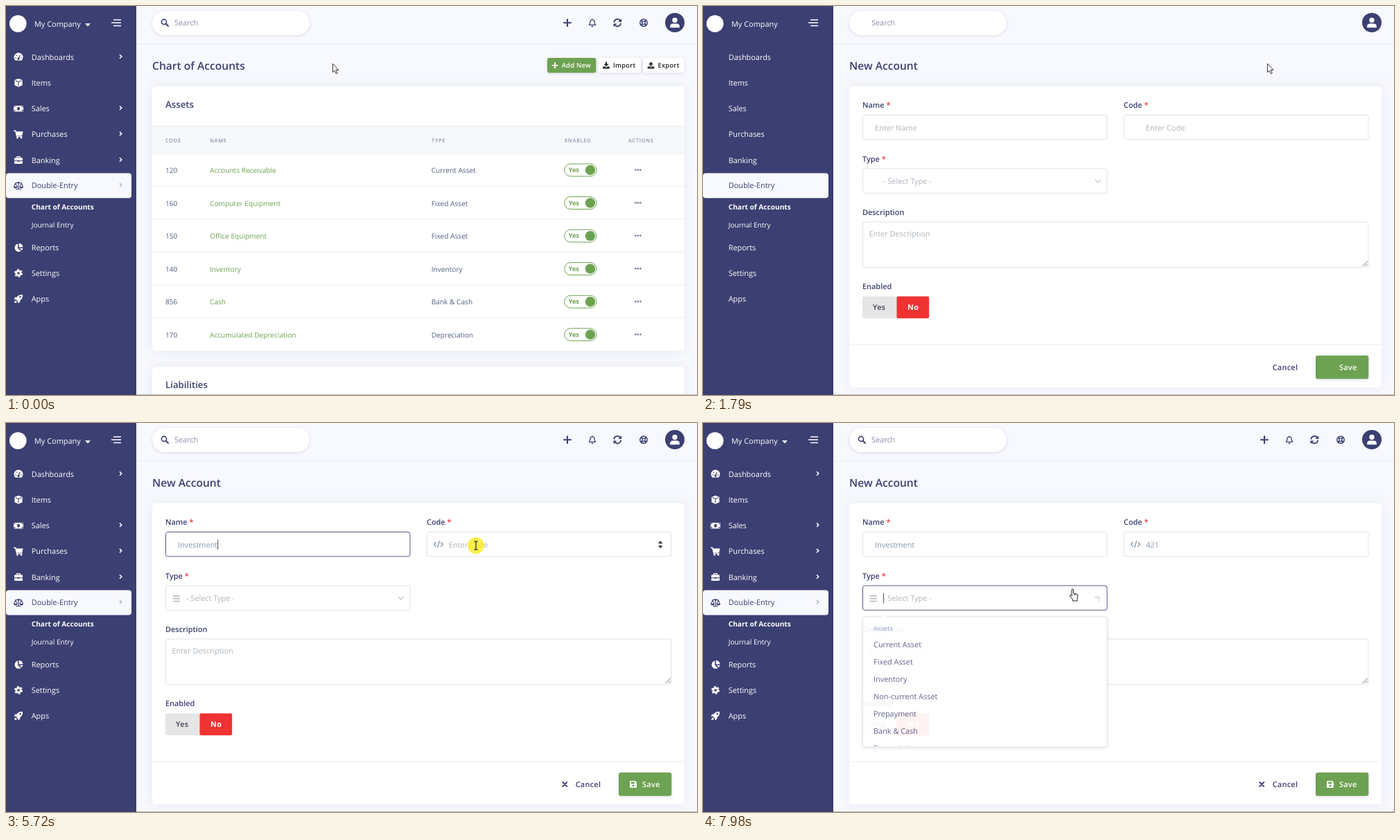
Recreate the animation shown at these times as an HTML page. Size 997 px wide and 562 px high, loop 8000 ms.

```html
<!DOCTYPE html>
<html lang="en">
<head>
<meta charset="utf-8">
<title>Chart of Accounts</title>
<style>
html, body { margin: 0; width: 100%; height: 100%; overflow: hidden; background: #f8f9fe; }
svg { display: block; font-family: "Open Sans", sans-serif; text-rendering: geometricPrecision; }
text { white-space: pre; }
.card { fill: #fff; filter: drop-shadow(0 0 8px rgba(136, 152, 170, .17)); }
.btn { filter: drop-shadow(0 1px 2px rgba(50, 50, 93, .16)); }
.field { fill: #fff; stroke: #dee2e6; }
.field.focus { stroke: #55588f; }
</style>
</head>
<body>
<svg id="stage" width="997" height="562" viewBox="0 0 997 562"></svg>
<script>
const LOOP = 8000, TICK = 77;
const NAVY = '#3c3f72', GREEN = '#6da252', SLATE = '#525f7f', GREY = '#8898aa', PALE = '#adb5bd',
      RED = '#ef3232', LINE = '#e9ecef', BASE = 10.92, SMALL = 10.15;

// Text placed by the middle of its capitals
const text = (x, y, s, fill = NAVY, size = BASE, weight = 400, more = '') =>
  `<text x="${x}" y="${y + size * .357}" font-size="${size}" font-weight="${weight}" fill="${fill}" ${more}>${s}</text>`;
const rect = (x, y, w, h, fill, r = 0, more = '') =>
  `<rect x="${x}" y="${y}" width="${w}" height="${h}" rx="${r}" fill="${fill}" ${more}/>`;
const dot = (x, y, r, fill, more = '') => `<circle cx="${x}" cy="${y}" r="${r}" fill="${fill}" ${more}/>`;
const fill = (d, c, more = '') => `<path d="${d}" fill="${c}" ${more}/>`;
const line = (d, c, w = 1, more = '') => `<path d="${d}" fill="none" stroke="${c}" stroke-width="${w}" ${more}/>`;
const icon = (x, y, body) => `<g class="icon" transform="translate(${x} ${y})">${body}</g>`;
const group = (id, body, more = '') => `<g id="${id}" ${more}>${body}</g>`;
const round = 'stroke-linecap="round" stroke-linejoin="round"';
const spaced = 'letter-spacing=".025em"';

const icons = {
  gauge: fill('M-4.6 5A6.5 6.5 0 1 1 4.6 5Z', '#fff') + line('M0 2.5L2.2-2.8', NAVY, 1.2) + dot(0, 2.6, 1.6, NAVY) +
    dot(-4, 1, .8, NAVY) + dot(-2.6, -2.4, .8, NAVY) + dot(4, 1, .8, NAVY),
  cube: fill('M0-6.2L5.6-4V3.6L0 6L-5.6 3.6V-4Z', '#fff') + line('M-4.4-3.3L0-1.6L4.4-3.3M0-1.6V4.6', NAVY, 1.1),
  money: rect(-7, -4, 14, 8.4, '#fff', 1) + `<ellipse cy=".2" rx="2" ry="2.5" fill="${NAVY}"/>` +
    [-1, 1].map(s => dot(5.6 * s, -2.7, 1, NAVY) + dot(5.6 * s, 3, 1, NAVY)).join(''),
  cart: line('M-6.5-5H-4.3L-2.3 2.9H4.8', '#fff', 1.5, round) + fill('M-4-4H6.6L5.3 1.7H-2.8Z', '#fff') +
    dot(-1.5, 5, 1.4, '#fff') + dot(4, 5, 1.4, '#fff'),
  bag: line('M-2.2-3V-5H2.2V-3', '#fff', 1.3) + rect(-6, -3.4, 12, 8.6, '#fff', 1.2) +
    line('M-6 1H6', NAVY, 1) + rect(-1.3, .2, 2.6, 2, NAVY),
  scale: line('M0-5V4.6M-3.6 5H3.6M-4.5-4H4.5M-6.4 1.6L-4.2-3.4L-2 1.6M6.4 1.6L4.2-3.4L2 1.6', NAVY, 1.1) +
    fill('M-7 1.4H-1.4A2.8 2.4 0 0 1-7 1.4ZM1.4 1.4H7A2.8 2.4 0 0 1 1.4 1.4Z', NAVY) + dot(0, -4.2, 1.4, NAVY),
  pie: fill('M-1-5.4V.8L3.6 5A5.8 5.8 0 1 1-1-5.4Z', '#fff') + fill('M.6-6.2A6 6 0 0 1 6.4-.6H.6Z', '#fff') +
    fill('M1.6.9H6.4A6 6 0 0 1 4.7 4Z', '#fff'),
  cog: dot(0, 0, 3.2, 'none', 'stroke="#fff" stroke-width="2.8"') +
    dot(0, 0, 5, 'none', 'stroke="#fff" stroke-width="2" stroke-dasharray="2.6 2.636"'),
  rocket: fill('M6-6C1-6.4-1.4-4-2.6-2.2H-5L-6.4.8L-3.6 1L-1 3.6L-.8 6.2L2.2 4.8V2.4C4.4 1 6.4-1.4 6-6Z', '#fff') +
    dot(2.6, -2.7, 1.2, NAVY) + fill('M-4 2.4L-2 4.4Q-3 6-6 6Q-6 3.2-4 2.4Z', '#fff')
};

function sidebar() {
  const items = [['Dashboards', 'gauge', 73.7, 1], ['Items', 'cube', 111], ['Sales', 'money', 148, 1],
    ['Purchases', 'cart', 185.3, 1], ['Banking', 'bag', 222.7, 1], ['Double-Entry', 'scale', 259.5, 1],
    ['Reports', 'pie', 349, 0], ['Settings', 'cog', 386], ['Apps', 'rocket', 423]];
  return rect(0, 0, 188, 562, NAVY) + dot(17.3, 25.5, 12.3, '#fff') +
    text(41, 25.8, 'My Company', '#fff') + icon(118, 27.3, fill('M-4-2H4L0 2.3Z', '#fff')) +
    line('M155 20H166M152 24.3H166M155 28.5H166', '#fff', 1.4) +
    rect(0, 241.5, 181, 36, '#f8f9fe', 4) +
    items.map(([label, name, y, more]) => {
      const on = name === 'scale';
      return icon(18, y, icons[name]) + text(36.7, y, label, on ? NAVY : '#fff') +
        (more ? icon(165.5, y - .7, line('M-1.5-2.7L1.3 0L-1.5 2.7', on ? '#b4b8c8' : '#fff', 1.5)) : '');
    }).join('') +
    text(36.7, 290, 'Chart of Accounts', '#fff', SMALL, 700) + text(36.7, 316, 'Journal Entry', '#fff', SMALL);
}

function header() {
  const glass = dot(-1, -1, 3.6, 'none', `stroke="${NAVY}" stroke-width="1.6"`) + line('M1.8 1.8L5 5', NAVY, 2, round);
  const bell = line('M-4.6 3.2C-3 1.6-3.4-.5-3-2A3.1 3.1 0 0 1 3-2C3.4-.5 3 1.6 4.6 3.2Z', NAVY, 1.3, round) +
    line('M0-5.6V-4.6', NAVY, 1.4) + fill('M-1.6 4.6H1.6A1.6 1.6 0 0 1-1.6 4.6Z', NAVY);
  const half = line('M-5-.6A5 5 0 0 1 4-3.2', NAVY, 1.8) + fill('M5.8-6V-1.2H1Z', NAVY);
  const ring = dot(0, 0, 5.2, 'none', `stroke="${NAVY}" stroke-width="1.5"`) +
    dot(0, 0, 2.3, 'none', `stroke="${NAVY}" stroke-width="1.3"`) +
    line('M-3.8-3.8L-1.6-1.6M3.8-3.8L1.6-1.6M-3.8 3.8L-1.6 1.6M3.8 3.8L1.6 1.6', NAVY, 2);
  return rect(188, 54.5, 809, 1, '#e9ebf4') +
    rect(211, 7, 227, 35, '#fff', 17.5, 'class="btn"') + icon(229, 24, glass) + text(243, 24.6, 'Search', '#8a90a6') +
    icon(810, 24.2, line('M-5 0H5M0-5V5', NAVY, 2.1, round)) + icon(846, 24.2, bell) +
    icon(882.3, 24.2, half + `<g transform="rotate(180)">${half}</g>`) + icon(920, 24.2, ring) +
    dot(965, 24, 14, NAVY) + dot(965, 20.5, 3.7, '#fff') +
    fill('M958.2 31.2V29.5A4 4 0 0 1 962.2 25.5H967.8A4 4 0 0 1 971.8 29.5V31.2Z', '#fff');
}

function listPage() {
  const rows = [['120', 'Accounts Receivable', 'Current Asset'], ['160', 'Computer Equipment', 'Fixed Asset'],
    ['150', 'Office Equipment', 'Fixed Asset'], ['140', 'Inventory', 'Inventory'],
    ['856', 'Cash', 'Bank &amp; Cash'], ['170', 'Accumulated Depreciation', 'Depreciation']];
  const heads = { 230: 'CODE', 294: 'NAME', 614: 'TYPE', 806: 'ENABLED', 898: 'ACTIONS' };
  const tray = s => fill('M-4.8 1.6H-2L0 3.2L2 1.6H4.8V4.6H-4.8Z', '#212529') +
    fill(s > 0 ? 'M-1-5H1V-2H3.4L0 1.6L-3.4-2H-1Z' : 'M-1 1.6H1V-1.4H3.4L0-5L-3.4-1.4H-1Z', '#212529');
  const button = (x, w, label, dir) => rect(x, 75, w, 21.6, '#fff', 3, 'class="btn"') +
    icon(x + 11.5, 85.8, tray(dir)) + text(x + 21.5, 85.8, label, '#212529', 9.37, 600, spaced);
  return text(211, 86, 'Chart of Accounts', NAVY, 15.6, 600) +
    rect(781, 75, 70.3, 21.6, GREEN, 3, 'id="add" class="btn"') +
    icon(792, 85.8, line('M-3.6 0H3.6M0-3.6V3.6', '#fff', 1.8, round)) +
    text(801.7, 85.8, 'Add New', '#fff', 9.37, 600, spaced) +
    button(854.5, 61.5, 'Import', 1) + button(919, 60, 'Export', -1) +
    rect(211, 116, 768, 382, '#fff', 5, 'class="card"') + text(230, 142, 'Assets', NAVY, 13.27, 600) +
    rect(211, 173.5, 768, 39.5, '#f6f8fc') + line('M211 173.5H979M211 213H979', LINE) +
    Object.entries(heads).map(([x, s]) => text(x, 193.8, s, GREY, 7.6, 600, 'letter-spacing=".6"')).join('') +
    rows.map(([code, name, type], i) => {
      const y = 237 + i * 47.55;
      return (i ? line(`M211 ${y - 23.9}H979`, LINE) : '') + text(230, y + .4, code, SLATE, SMALL) +
        text(294, y + .4, name, GREEN, SMALL) + text(613.7, y + .4, type, SLATE, SMALL) +
        rect(805.7, y - 9, 46.3, 18, '#fff', 9, `stroke="${GREEN}"`) + dot(843, y, 7.2, GREEN) +
        text(811.7, y, 'Yes', GREEN, 9.1, 700) + [0, 1, 2].map(k => dot(908.4 + k * 3.5, y - .3, 1.3, '#747b96')).join('');
    }).join('') +
    rect(211, 521, 768, 60, '#fff', 5, 'class="card"') + text(230, 547.5, 'Liabilities', NAVY, 13.27, 600);
}

function formPage() {
  const label = (x, y, s, must) => text(x, y, s + (must ? ` <tspan fill="${RED}">*</tspan>` : ''), NAVY, BASE, 600);
  const field = (id, x, y, w, h) => rect(x, y, w, h, '#fff', 3, `id="${id}" class="field"`);
  const floppy = fill('M-5-5H2.8L5-2.8V5H-5Z', '#fff') + rect(-3, -3.5, 5, 2.6, GREEN) + dot(0, 2, 1.6, GREEN);
  return text(211, 86, 'New Account', NAVY, 15.6, 600) + rect(211, 116, 768, 435, '#fff', 5, 'class="card"') +
    label(230, 143.3, 'Name', 1) + field('nameBox', 230.5, 157.5, 352.5, 35.3) + text(248, 176, '', PALE, BASE, 400, 'id="name"') +
    label(607, 143.3, 'Code', 1) + field('codeBox', 607.5, 157.5, 352.5, 35.3) +
    icon(624, 175.3, line('M-3.8-2.8L-6.4 0L-3.8 2.8M3.8-2.8L6.4 0L3.8 2.8M1.4-4.6L-1.4 4.6', GREY, 1.4, round)) +
    text(639, 176, '', PALE, BASE, 400, 'id="code"') +
    group('spin', fill('M940.8 174.2H947.6L944.2 170ZM940.8 177H947.6L944.2 181.2Z', '#404040')) +
    label(230, 220.7, 'Type', 1) + field('typeBox', 230.5, 235, 352.5, 35.3) +
    icon(245.8, 253.8, line('M-5-3.8H5M-5 0H5M-5 3.8H5', PALE, 1.5)) + text(260, 253.3, '- Select Type -', PALE) +
    group('arrow', line('M-4-2L0 2L4-2', '#bcc2cc', 1.1)) +
    label(230, 297.7, 'Description') + field('noteBox', 230.5, 312, 729.5, 65.5) + text(239.5, 329, 'Enter Description', PALE) +
    line('M951.5 376L959 368.5M955.5 376L959 372.5', '#666', .9) +
    label(230, 405.3, 'Enabled') + rect(230, 419.5, 52, 31.7, '#e5e5e5', 3) + rect(279.5, 419.5, 46.7, 31.7, RED, 2) +
    text(245, 435.6, 'Yes', '#414558', BASE, 600, spaced) + text(295, 435.6, 'No', '#fff', BASE, 700, spaced) +
    line('M211 489H979', LINE) + icon(806.3, 522, line('M-3-3L3 3M3-3L-3 3', NAVY, 1.8, round)) +
    text(821.7, 522.2, 'Cancel', NAVY, BASE, 600, spaced) +
    rect(884, 505, 76.3, 33.7, GREEN, 3, 'class="btn"') + icon(905, 522, floppy) +
    text(918, 522.2, 'Save', '#fff', BASE, 600, spaced) + rect(0, 168.5, 1, 14.5, '#555', 0, 'id="caret"');
}

function menu() {
  const items = ['Current Asset', 'Fixed Asset', 'Inventory', 'Non-current Asset', 'Prepayment', 'Bank &amp; Cash', 'Depreciation'];
  return '<clipPath id="cut"><path d="M231 -1H583V187H231Z"/></clipPath>' +
    fill('M256 .5L262-5L268 .5Z', '#fff') +
    rect(230.5, 0, 352.5, 188, '#fff', 3, 'stroke="#e4e7ed" class="btn"') + fill('M256.5 1.5L262-4L267.5 1.5Z', '#fff') +
    group('items', text(246, 16.2, 'Assets', '#8b9cc6', 9.37) +
      items.map((s, i) => text(246, 40 + i * 25.1, s, '#5a5d89')).join(''), 'clip-path="url(#cut)"');
}

const pointers = {
  pointArrow: fill('M.4.4V12.8L3.2 10.2L5.2 14.8L7.2 13.9L5.2 9.5H9Z', '#fff', 'stroke="#222" stroke-width=".9"'),
  pointBeam: line('M-3-6H-1L0-5L1-6H3M0-5V5M-3 6H-1L0 5L1 6H3', '#222', 1.2),
  pointHand: fill('M-1 1A1.2 1.2 0 0 1 1.4 1V6L6.5 7.2Q8 7.8 7.8 9.4L7 13.5V17H.4V15L-3.6 10Q-4 8.4-2.4 8.6L-1 10Z', '#fff',
    'stroke="#222" stroke-width="1" stroke-linejoin="round"') + line('M3.4 7V9M5.5 7.5V9.3', '#222', .8)
};

stage.innerHTML = rect(0, 0, 997, 562, '#f8f9fe') + header() + group('list', listPage()) + group('form', formPage()) +
  group('menu', menu()) + rect(188, 561, 809, 1, '#b4b5bb') + sidebar() +
  group('pointer', dot(0, 0, 12, '#fbec22', 'id="glow" opacity=".8"') +
    Object.entries(pointers).map(([id, body]) => group(id, body)).join(''));

const $ = id => document.getElementById(id);
const show = (id, on) => $(id).style.display = on ? '' : 'none';
const glyphs = [...document.querySelectorAll('.icon')];

// start, steps, x, y, sag: each move goes on from the end of the one before
const moves = [[80, 11, 841, 86, 4], [1150, 2, 814, 83, 0], [2250, 6, 561, 145, 0], [2710, 2, 528, 176, 0],
  [3250, 3, 541, 170, 0], [5570, 2, 678, 177, 0], [7370, 5, 533, 240, 0]];
const clicks = [[1227, 1330], [2940, 3020], [5720, 5890], [7750, 7900]];
const keys = {
  name: ['Enter Name', 'Investment', [3250, 3630, 3860, 4320, 4480, 4780, 4950, 5030, 5100, 5270]],
  code: ['Enter Code', '421', [6500, 6820, 7050]]
};
const within = (t, [a, b]) => t >= a && t < b;

function pointerAt(t) {
  let x = 471, y = 83;
  for (const [start, steps, toX, toY, sag] of moves) {
    if (t < start) break;
    const p = Math.min(1, (Math.floor((t - start) / TICK) + 1) / steps), e = p * p * (3 - 2 * p);
    x += (toX - x) * e;
    y += (toY - y) * e + sag * 4 * e * (1 - e);
  }
  return [x, y];
}

function type(id, t) {
  const [hint, word, times] = keys[id], n = times.filter(k => t >= k).length, el = $(id);
  const s = n ? word.slice(0, n) : hint;
  if (el.textContent !== s) el.textContent = s;
  el.setAttribute('fill', n ? GREY : PALE);
  return n ? el.getComputedTextLength() : 0;
}

function render(t) {
  const form = t >= 1790;
  show('list', !form);
  show('form', form);
  glyphs.forEach(g => g.style.visibility = within(t, [1790, 1940]) ? 'hidden' : '');
  $('add').setAttribute('fill', within(t, clicks[0]) ? '#5f9346' : GREEN);

  const [x, y] = pointerAt(t);
  const inField = form && y > 157 && y < 193, onSelect = form && y > 235;
  $('pointer').setAttribute('transform', `translate(${x} ${y})`);
  show('pointArrow', !inField && !onSelect);
  show('pointBeam', inField);
  show('pointHand', onSelect);
  show('glow', clicks.some(c => within(t, c)));

  const focus = t < 3020 ? '' : t < 5800 ? 'name' : t < 7830 ? 'code' : 'type';
  for (const id of ['name', 'code', 'type']) $(id + 'Box').classList.toggle('focus', focus === id);
  show('spin', focus === 'code' || inField && x > 607);
  const ends = { name: 248 + type('name', t), code: 639 + type('code', t), type: 260 };
  show('caret', focus && !within(t, [6270, 6500]));
  $('caret').setAttribute('x', ends[focus] || 0);
  $('caret').setAttribute('y', focus === 'type' ? 246 : 168.5);

  const open = t < 7830 ? 0 : t < 7900 ? .1 : t < 7980 ? .72 : 1;
  show('menu', open);
  $('menu').setAttribute('transform', `translate(0 280) scale(1 ${open})`);
  $('menu').setAttribute('opacity', open * .94);
  $('arrow').setAttribute('transform', `translate(569.8 253) rotate(${-135 * open})`);
}

const begin = performance.now();
function loop() {
  render((performance.now() - begin) % LOOP);
  requestAnimationFrame(loop);
}
loop();
</script>
</body>
</html>
```
